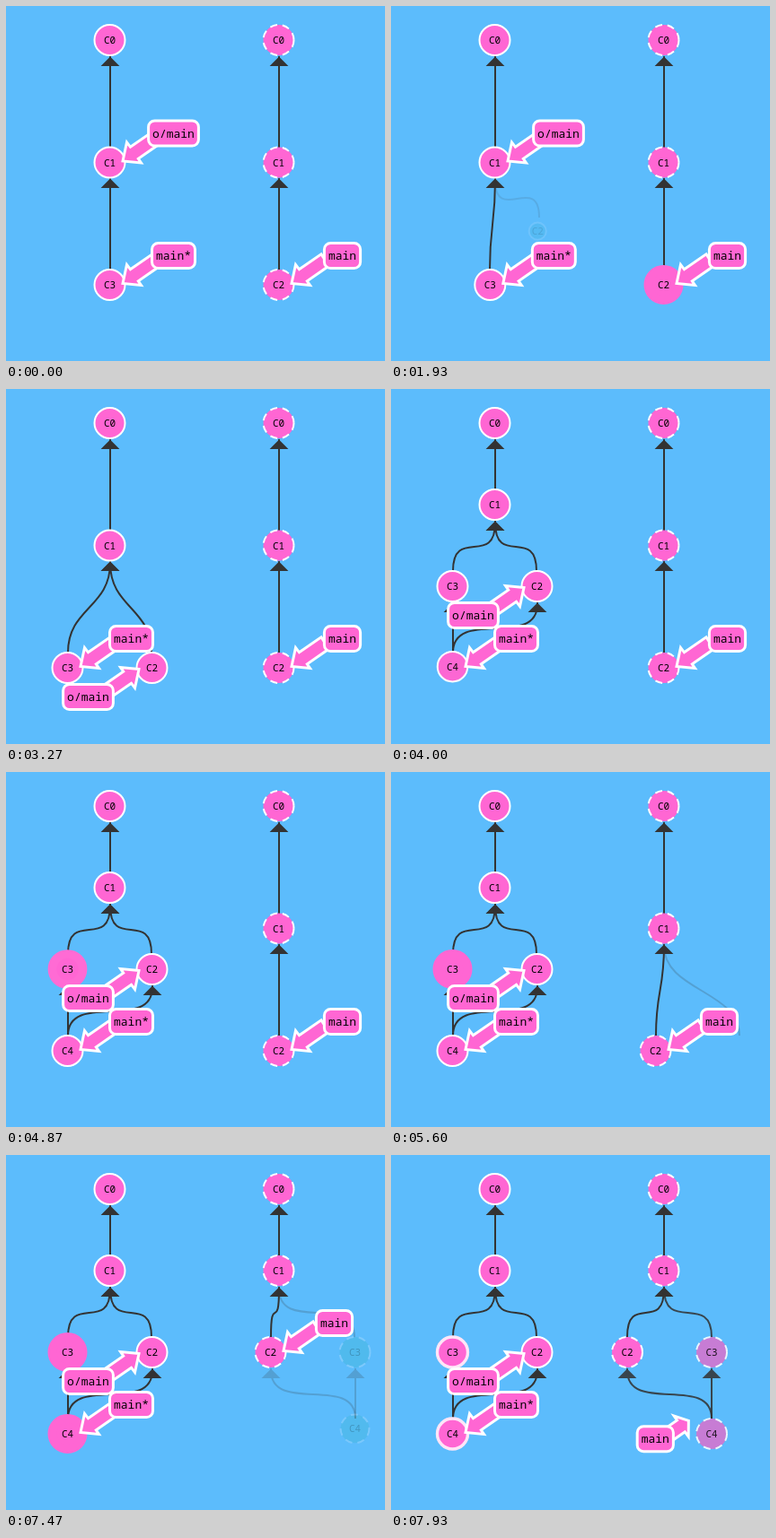
An HTML page that plays this animation: 422x396 px, repeating every 8000 ms.

```html
<!DOCTYPE html>
<html lang="en">
<head>
<meta charset="utf-8">
<title>Commit trees</title>
<style>
  html, body { margin: 0; width: 100%; height: 100%; overflow: hidden; background: #5cbcfc; }
  svg { display: block; }
  text { font-family: "Noto Sans Mono", "DejaVu Sans Mono", monospace; text-anchor: middle; fill: #000; }
  .commit { font-size: 11px; font-weight: 500; }
  .branch { font-size: 13px; }
  .flag { fill: #ff66d3; stroke: #fff; stroke-width: 3; }
  .edge { fill: #333; stroke: #333; stroke-width: 2; }
</style>
</head>
<body>
<svg id="stage" width="422" height="396" viewBox="0 0 422 396"></svg>
<script>
const LOOP = 8000;
const RADIUS = 17;
const PINK = [255, 102, 211], TEAL = [36, 179, 179], WHITE = [255, 255, 255];

// Start times of each phase
const FETCH_MARK = 885, FETCH_BIRTH = 1713, FETCH_DONE = 2545, MERGE = 3283;
const PUSH_MARK1 = 4410, PUSH_BIRTH1 = 5210, PUSH_MARK2 = 6010, PUSH_BIRTH2 = 6813, PUSH_DONE = 7646;
const MOVE = 400, BOUNCE = 800, MARK = 528;

const stage = document.getElementById('stage');
const clamp = v => Math.max(0, Math.min(1, v));
const lerp = (a, b, p) => a + (b - a) * p;
const mix = (a, b, p) => `rgb(${a.map((v, i) => Math.round(lerp(v, b[i], p)))})`;

// Cubic bezier (.42, 0, .58, 1), solved by bisection
function easeInOut(n) {
  let lo = 0, hi = 1;
  for (let i = 0; i < 24; i++) {
    const s = (lo + hi) / 2;
    const x = 3 * s * (1 - s) * (1 - s) * .42 + 3 * s * s * (1 - s) * .58 + s ** 3;
    if (x < n) lo = s; else hi = s;
  }
  return lo * lo * (3 - 2 * lo);
}

function bounce(n) {
  const k = 7.5625, d = 2.75;
  if (n < 1 / d) return k * n * n;
  if (n < 2 / d) return k * (n - 1.5 / d) ** 2 + .75;
  if (n < 2.5 / d) return k * (n - 2.25 / d) ** 2 + .9375;
  return k * (n - 2.625 / d) ** 2 + .984375;
}

const progress = (t, start, length = MOVE, ease = easeInOut) => ease(clamp((t - start) / length));

// track = [initial, [start, value], ...]
function follow(track, t) {
  return track.slice(1).reduce((v, [start, value]) => lerp(v, value, progress(t, start)), track[0]);
}

function set(el, attrs) {
  for (const name in attrs) el.setAttribute(name, attrs[name]);
}

function add(tag, attrs) {
  const el = document.createElementNS('http://www.w3.org/2000/svg', tag);
  set(el, attrs);
  stage.append(el);
  return el;
}

const L = 115.5, R = 303.5;
const c1Y = start => [174.5, [start, 129]];
const tipY = start => [311, [start, 220]];

// birth: start time and point of origin; adopted: when an orphan joins a branch
const local = {
  C0: { x: [L], y: [38] },
  C1: { x: [L], y: c1Y(MERGE) },
  C3: { x: [L, [FETCH_BIRTH, L - 9], [FETCH_DONE, L - 47]], y: tipY(MERGE), mark: [PUSH_MARK1, PUSH_DONE] },
  C2: { x: [L + 85, [FETCH_DONE, L + 47]], y: tipY(MERGE), birth: [FETCH_BIRTH, L, 174.5], adopted: FETCH_DONE },
  C4: { x: [L - 47], y: [311], birth: [MERGE, L - 47, 220], mark: [PUSH_MARK2, PUSH_DONE] }
};
const remote = {
  C0: { x: [R], y: [38] },
  C1: { x: [R], y: c1Y(PUSH_BIRTH2) },
  C2: { x: [R, [PUSH_BIRTH1, R - 9], [PUSH_DONE, R - 47]], y: tipY(PUSH_BIRTH2), mark: [FETCH_MARK, FETCH_DONE] },
  C3: { x: [R + 85, [PUSH_DONE, R + 47]], y: tipY(PUSH_BIRTH2), birth: [PUSH_BIRTH1, R, 174.5], adopted: PUSH_DONE },
  C4: { x: [R + 85, [PUSH_DONE, R + 47]], y: [311], birth: [PUSH_BIRTH2, R + 85, 220], adopted: PUSH_DONE }
};
const links = [['C1', 'C0'], ['C2', 'C1'], ['C3', 'C1'], ['C4', 'C3'], ['C4', 'C2']];

// side: 1 puts the label up to the right of its commit, -1 down to the left
const branches = [
  { name: 'o/main', x: [L, [FETCH_DONE, L + 47]], y: [174.5, [FETCH_DONE, 311], [MERGE, 220]], side: [1, [FETCH_DONE, -1]] },
  { name: 'main*', x: local.C3.x, y: [311], side: [1] },
  { name: 'main', x: remote.C2.x.slice(0, 2).concat([[PUSH_DONE, R + 47]]),
    y: [311, [PUSH_BIRTH2, 220], [PUSH_DONE, 311]], side: [1, [PUSH_DONE, -1]] }
];
// Arrow outline relative to the commit it points at, tip first
const ARROW = [[14.5, -1.5], [19, -22.5], [23, -17.2], [47.5, -34.2], [56.3, -21.2], [31.8, -4.2], [35, .5]];

const edges = [], commits = [];
for (const tree of [local, remote]) {
  for (const [tail, head] of links) {
    edges.push({ tail: tree[tail], head: tree[head], settled: tail === 'C4', path: add('path', { class: 'edge' }) });
  }
}
for (const tree of [local, remote]) {
  for (const name in tree) {
    const commit = tree[name];
    commit.dashed = tree === remote;
    commit.circle = add('circle', {});
    commit.text = add('text', { class: 'commit' });
    commit.text.textContent = name;
    commits.push(commit);
  }
}
for (const branch of branches) {
  branch.arrow = add('path', { class: 'flag' });
  branch.width = branch.name.length * 7.8 + 9;
  branch.rect = add('rect', { class: 'flag', width: branch.width, height: 28, rx: 7 });
  branch.text = add('text', { class: 'branch' });
  branch.text.textContent = branch.name;
}

function place(commit, t, length, ease) {
  const x = follow(commit.x, t), y = follow(commit.y, t);
  if (!commit.birth) return { x, y, grown: 1 };
  const [start, fromX, fromY] = commit.birth;
  const grown = progress(t, start, length, ease);
  return { x: lerp(fromX, x, grown), y: lerp(fromY, y, grown), grown };
}

function opacityOf(commit, t, grown) {
  return commit.adopted ? lerp(.2 * grown, 1, progress(t, commit.adopted)) : grown;
}

const visible = (commit, t) => !commit.birth || t >= commit.birth[0];

function drawEdge({ tail, head, settled, path }, t) {
  const from = place(tail, t, MOVE, easeInOut);
  const x = Math.round(follow(head.x, t));
  const y = Math.round((settled ? 220 : follow(head.y, t)) + RADIUS * 1.15);
  const fx = Math.round(from.x), fy = Math.round(from.y - RADIUS);
  set(path, {
    d: `M${fx},${fy}C${fx},${fy - 50} ${x},${y + 50} ${x},${y}` +
       `L${x - 8},${y + 8}L${x + 8},${y + 8}L${x},${y}C${x},${y + 50} ${fx},${fy - 50} ${fx},${fy}`,
    opacity: visible(tail, t) ? opacityOf(tail, t, from.grown) : 0
  });
}

function drawCommit(commit, t) {
  const { x, y, grown } = place(commit, t, BOUNCE, bounce);
  const opacity = visible(commit, t) ? opacityOf(commit, t, grown) : 0;
  let glow = 0, dashed = commit.dashed;
  if (commit.mark) {
    const [on, off] = commit.mark;
    glow = progress(t, on, MARK) * (1 - progress(t, off));
    if (t >= on + MARK && t < off + MOVE) dashed = false;
  }
  const width = lerp(2, 10, glow);
  set(commit.circle, {
    cx: x, cy: y, r: RADIUS * grown, opacity,
    fill: mix(TEAL, PINK, commit.adopted ? progress(t, commit.adopted) : 1),
    stroke: mix(WHITE, PINK, glow),
    'stroke-width': width,
    'stroke-dasharray': dashed ? `${width * 4} ${width * 3}` : 'none'
  });
  set(commit.text, { x, y: y + 4, opacity });
}

// The flipped arrow runs round the other way, so each point meets its mirror partner
function arrowPath(cx, cy, side) {
  const flip = (1 - side) / 2, n = ARROW.length;
  const points = ARROW.map(([dx, dy], i) => {
    const [mx, my] = ARROW[(n - i) % n];
    return `${cx + lerp(dx, -mx, flip)},${cy + lerp(dy, -my, flip)}`;
  });
  return `M${points.join('L')}Z`;
}

function drawBranch({ x, y, side, arrow, rect, text, width }, t) {
  const cx = follow(x, t), cy = follow(y, t), s = follow(side, t);
  const midX = cx + 71 * s, midY = cy - 32.5 * s;
  set(arrow, { d: arrowPath(cx, cy, s) });
  set(rect, { x: midX - width / 2, y: midY - 14 });
  set(text, { x: midX, y: midY + 4.5 });
}

function draw(now) {
  const t = now % LOOP;
  edges.forEach(edge => drawEdge(edge, t));
  commits.forEach(commit => drawCommit(commit, t));
  branches.forEach(branch => drawBranch(branch, t));
  requestAnimationFrame(draw);
}

draw(0);
</script>
</body>
</html>
```
